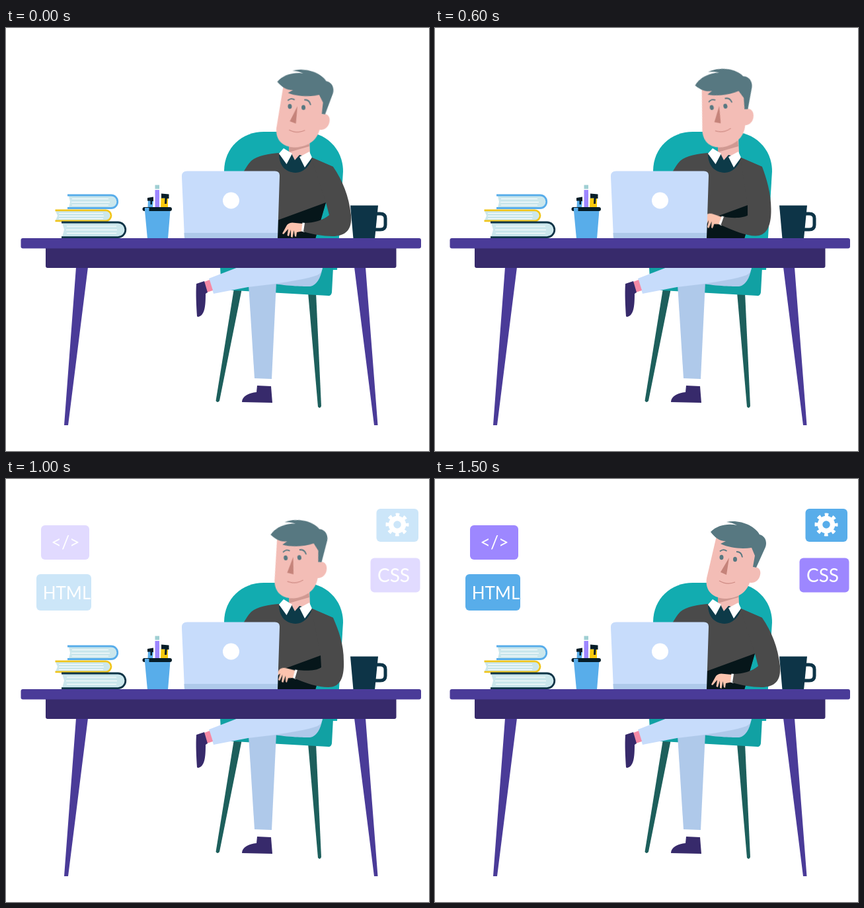
Animation of 640x640 px, one loop 3000 ms. Source, as an HTML page:

```html
<!DOCTYPE html>
<html lang="en">
<head>
<meta charset="utf-8">
<title>Developer at a desk</title>
<style>
html, body { margin: 0; width: 100%; height: 100%; overflow: hidden; background: #fff; }
svg { display: block; width: 100vw; height: 100vh; }
text { font-family: Lato, sans-serif; fill: #fff; text-anchor: middle; }

.head, .arm, .hand, .tiles { animation: 3s infinite; }
.head { animation-name: tilt; transform-origin: 433.5px 180px; }
.arm { animation-name: reach; }
.hand { animation-name: slide; transform-origin: 451px 301.5px; }
.tiles { animation-name: appear; }

@keyframes tilt {
  0%, 3.333% { transform: rotate(-3.8deg); animation-timing-function: steps(3); }
  13.333% { transform: rotate(-8.8deg); animation-timing-function: steps(4); }
  26.666% { transform: rotate(-19deg); animation-timing-function: steps(2); }
  33.333% { transform: rotate(-9.7deg); animation-timing-function: steps(1); }
  36.666% { transform: rotate(-4.8deg); animation-timing-function: steps(2); }
  43.333%, 100% { transform: rotate(0deg); }
}
@keyframes reach {
  0%, 3.333% {
    d: path("M462 196L495 210C509 230 519 255 522 283C524 305 514 315 494 315C479 315 463 312 450 308L452 295C465 295 480 291 489 283L484 264Z");
    animation-timing-function: steps(3);
  }
  13.333% {
    d: path("M462 196L495 210C505 230 513 250 514 278C516 303 507 315 490 315C472 315 457 310 441 304L444 291C454 292 472 292 480 285L478 266Z");
    animation-timing-function: steps(4);
  }
  26.666% {
    d: path("M462 196L495 210C498 225 504 250 503 270C502 302 493 314 480 314C468 314 447 303 424 292L430 280C440 283 456 285 466 282L468 271Z");
    animation-timing-function: steps(2);
  }
  33.333% {
    d: path("M462 196L495 210C503 229 511 249 511 276C512 303 504 315 488 315C471 315 455 309 437 302L441 289C451 290 469 291 477 285L476 267Z");
    animation-timing-function: steps(1);
  }
  36.666% {
    d: path("M462 196L495 210C506 230 516 251 517 279C518 303 508 315 491 315C473 315 458 310 443 305L446 292C456 293 474 292 482 285L480 266Z");
    animation-timing-function: steps(2);
  }
  43.333%, 100% {
    d: path("M462 196L495 210C509 230 519 255 522 283C524 305 514 315 494 315C479 315 463 312 450 308L452 295C465 295 480 291 489 283L484 264Z");
  }
}
@keyframes slide {
  0%, 3.333% { transform: translate(0px, 0px) rotate(0deg); animation-timing-function: steps(3); }
  13.333% { transform: translate(-8.5px, -4px) rotate(8deg); animation-timing-function: steps(4); }
  26.666% { transform: translate(-24px, -15.5px) rotate(18deg); animation-timing-function: steps(2); }
  33.333% { transform: translate(-12px, -6px) rotate(9deg); animation-timing-function: steps(1); }
  36.666% { transform: translate(-6.5px, -3px) rotate(5deg); animation-timing-function: steps(2); }
  43.333%, 100% { transform: translate(0px, 0px) rotate(0deg); }
}
@keyframes appear {
  0%, 26.666% { opacity: 0; animation-timing-function: steps(5); }
  43.333% { opacity: .76; animation-timing-function: steps(2); }
  50%, 100% { opacity: 1; }
}
</style>
</head>
<body>
<svg viewBox="0 0 640 640">
  <!-- chair -->
  <path fill="#12acb0" d="M330 217C330 180 358 157 390 157H449C483 157 510 182 510 217L501 366H338Z"/>
  <g fill="#1d5f5c">
    <path d="M345 394H357L323 564Q320 568 317.500 564Z"/>
    <path d="M457 400H469L477 572Q475 577 472 573Z"/>
  </g>
  <path fill="#11a1a3" d="M324 362H495L493 400Q492 406 487 405L326 396Z"/>

  <!-- legs -->
  <path fill="#afc9ea" d="M367 388L409 384L402 531L376 530Z"/>
  <path fill="#afc9ea" d="M400 386C430 391 450 391 460 391C472 389 477 374 479 362H400Z"/>
  <path fill="#c7dcfb" d="M307 379L351 362H479Q478 371 471 374C455 380 430 383 408 387L366 392L314 402Z"/>
  <path fill="#f58aa5" d="M300 384L308 381L313 397L304 400Z"/>
  <g fill="#372a6b">
    <path d="M288 387L300 383L305 400L302 402C302 420 301 436 290 437L289 436C288 420 287 402 288 387Z"/>
    <path d="M380 541L401 542L403 567L357 566C357 557 368 552 379 551Z"/>
  </g>

  <!-- mug -->
  <path fill="#0d3447" d="M521 268.500H563L558 319H525.500Z"/>
  <path fill="none" stroke="#0d3447" stroke-width="5" d="M560 281H566Q574 281 574 288V298Q574 305 566 305H557"/>

  <!-- body -->
  <path fill="#f3bdb6" d="M428 165H459L460 190L437 205L428 190Z"/>
  <path fill="#d09992" d="M428 168H458L459 179L428 188Z"/>
  <path fill="#4a4a4a" d="M357 222Q365 207 371 201C380 193 398 190 413 189Q424 214 438 215Q456 212 463 196L495 210L484 264L468 319H357Z"/>
  <path fill="#06161a" d="M405 293L484 264L468 319H405Z"/>
  <path fill="#0d3a48" d="M413 192L432 190L437 200L444 192L463 197C459 210 449 219 438 219C424 218 414 210 413 192Z"/>
  <path fill="#fff" d="M413 190L420 182L433 190L424.500 206ZM444 195L459 187L463 196L452 211Z"/>

  <g class="hand">
    <path fill="#fbc3ae" d="M449 296L433 294.500Q426 295 424 300L418 311L420 312L427 304L425.500 314L428 315L431 305V316L433.500 317L435.500 306L437 315L439 316L440 309L448 307.500Z"/>
    <path fill="#fff" d="M448.500 294.500L453 295L451.500 309L447 307.500Z"/>
  </g>
  <path class="arm" fill="#4a4a4a"/>

  <g class="head">
    <path fill="#f3bdb6" d="M426 86L412 146C406 168 420 180 438 181C458 181 472 172 477 154L490 100Z"/>
    <path fill="#f3bdb6" d="M480 134C488 131 494 137 492 145C490 155 481 159 474 156Z"/>
    <path fill="#577881" d="M417 80C428 69 444 67 457 70Q450 66 441 65C462 61 484 71 491 84C499 86 503 94 500 103L486 134L481 133L484 116L479 104C465 106 447 105 432 98L440 94C430 94 423 88 417 80Z"/>
    <g fill="#577881">
      <ellipse cx="433.500" cy="118.500" rx="3" ry="3.800"/>
      <ellipse cx="454" cy="121.500" rx="3" ry="3.800"/>
    </g>
    <path fill="none" stroke="#577881" stroke-width="1.900" d="M431 109.500Q436 105 441.500 109M456 110Q464 110 465 118.500"/>
    <path fill="#c5837a" d="M445 119L432 141L441 145Z"/>
    <path fill="none" stroke="#cd8a83" stroke-width="1.200" d="M430 154Q442 161 454 156"/>
  </g>

  <!-- laptop -->
  <path fill="#c7dcfb" d="M274 216.500H407Q414.500 216.500 414 224L411 318H270L266 225Q265.500 216.500 274 216.500Z"/>
  <path fill="#aec9ea" d="M269.500 310H411V318.500H270Z"/>
  <circle cx="340.500" cy="261" r="12.500" fill="#fff"/>

  <!-- books -->
  <g fill="#cbe7ec">
    <path d="M95 254H160Q167 256 167 263T160 272H95L97 263Z"/>
    <path d="M75 277H151Q157 278 157 284T151 291H75L78 284Z"/>
    <path d="M85 295H170Q179 297 179 305.500T170 316H85L88 305Z"/>
  </g>
  <path stroke="#fff" stroke-width="1.200" d="M100 258.500H155M99 263.500H157M100 268H155M80 280.500H147M80 284.500H148M80 288.500H147M92 300H167M91 305.500H168M92 310.500H167"/>
  <g fill="none" stroke-width="2.800">
    <path stroke="#58adea" d="M93 253H159A9.700 9.700 0 0 1 159 272.500H93"/>
    <path stroke="#f0c51c" d="M74.500 275.800H151A8 8 0 0 1 151 291.800H74.500"/>
    <path stroke="#0d3447" d="M84 294H169.500A11.300 11.300 0 0 1 169.500 316.600H84"/>
  </g>

  <!-- pens -->
  <path fill="#58adea" d="M215 260L223 261L222 272H214.500Z"/>
  <path fill="#051d28" d="M214 257L223 255.500V262H221L221 267H218.500V261.500H214Z"/>
  <path fill="#9d87ff" d="M225.500 245H232V272H225.500Z"/>
  <path fill="#9fcfd3" d="M225.500 237.500H232V243.500H225.500Z"/>
  <path fill="#f8c90e" d="M234.500 257L245 258V272H234Z"/>
  <path fill="#051d28" d="M235 250.500L246.500 251.500V258H243.500L243 266H240L240.500 257.500H235Z"/>
  <path fill="#58adea" d="M210 276H248.500L245 319H214Z"/>
  <rect x="206.500" y="271" width="44.500" height="6" rx="3" fill="#051d28"/>
  <path fill="#58adea" d="M210 272H216.500V277H210Z"/>

  <!-- table -->
  <path fill="#4a3b98" d="M106 362H124L94 601H88ZM527 362H544L562.500 601H557Z"/>
  <path fill="#372a6b" d="M60 330H590.500V360Q590.500 363 587.500 363H63Q60 363 60 360Z"/>
  <rect x="22.500" y="318" width="605.500" height="15.500" rx="3" fill="#4a3b98"/>

  <!-- tiles -->
  <g class="tiles">
    <rect x="53" y="70" width="73" height="52" rx="6" fill="#9d87ff"/>
    <text x="90" y="105" font-size="27">&lt;/&gt;</text>
    <rect x="46" y="144" width="83" height="55" rx="6" fill="#58adea"/>
    <text x="92" y="181.500" font-size="26">HTML</text>
    <rect x="560.500" y="45" width="63.500" height="50" rx="6" fill="#58adea"/>
    <g fill="none" stroke="#fff">
      <circle cx="592" cy="69" r="9.500" stroke-width="7.500"/>
      <circle cx="592" cy="69" r="15" stroke-width="5" stroke-dasharray="5.500 6.281" stroke-dashoffset="2.750"/>
    </g>
    <rect x="551.500" y="119.500" width="75" height="52" rx="6" fill="#9d87ff"/>
    <text x="586.500" y="156" font-size="28">CSS</text>
  </g>
</svg>
</body>
</html>
```
